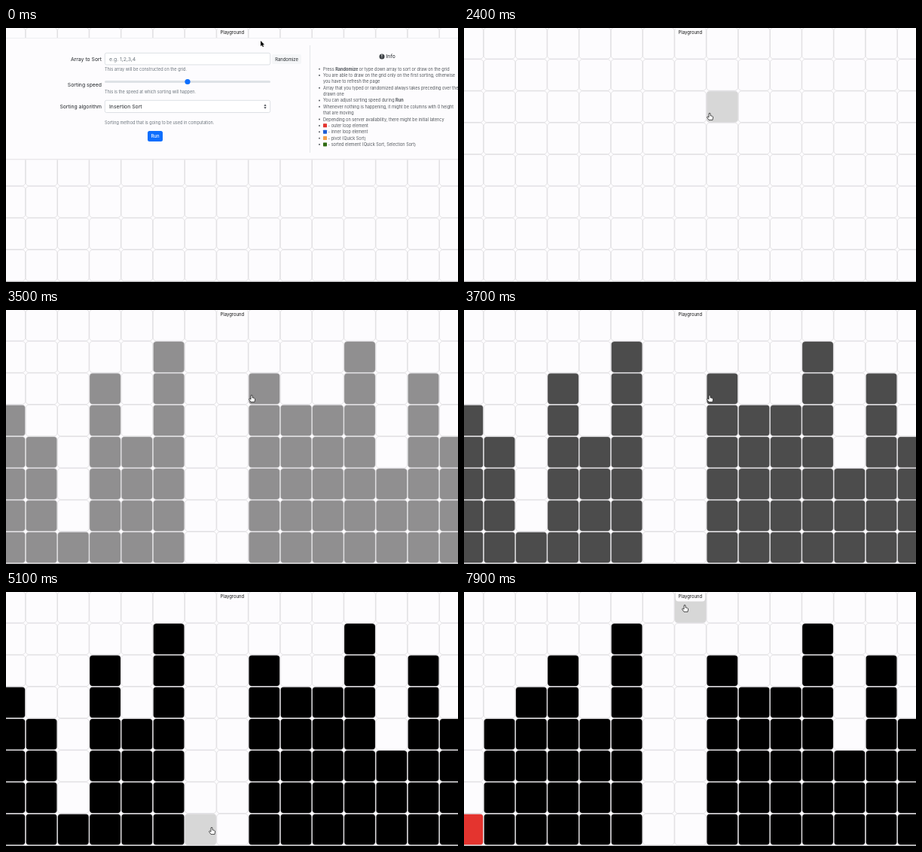
An HTML page with a canvas for the animation above (8 s loop, 600 px wide and 338 px high).

```html
<!DOCTYPE html>
<html lang="en">
<head>
<meta charset="utf-8">
<title>Sorting playground</title>
<style>
html, body { margin: 0; width: 100%; height: 100%; overflow: hidden; background: #fdfcfe; }
canvas { display: block; width: 100vw; height: 100vh; }
</style>
</head>
<body>
<canvas></canvas>
<script>
const W = 600, H = 338, LOOP = 8000;
const CELL = 42.25, LEFT = -16.3, TOP = -0.9, COLS = 15, ROWS = 8;
const WHITE = [253, 252, 254], BLACK = [0, 0, 0], RED = [228, 52, 47], HOVER = [215, 215, 215];
const PAPER = '#fdfcfe', LINE = '#d7d6d9', BLUE = '#0d6efd';
const DARK = '#212529', MUTED = '#6c757d', BODY = '#50555a';
const FONT = 'Inter, "Open Sans", sans-serif';

const canvas = document.querySelector('canvas');
const ctx = canvas.getContext('2d');

const clamp = v => Math.min(1, Math.max(0, v));
const smooth = v => v * v * (3 - 2 * v);
const lerp = (a, b, k) => a + (b - a) * k;
const mix = (a, b, k) => a.map((v, i) => lerp(v, b[i], k));
const rgb = c => `rgb(${c.map(Math.round)})`;

// CSS "ease": cubic-bezier(.25, .1, .25, 1)
function ease(x) {
  if (x <= 0 || x >= 1) return clamp(x);
  let lo = 0, hi = 1, u = 0.5;
  for (let i = 0; i < 20; i++) {
    u = (lo + hi) / 2;
    const bx = 0.75 * u * (1 - u) + u ** 3;
    if (bx < x) lo = u; else hi = u;
  }
  return 0.3 * u * (1 - u) ** 2 + 3 * u * u * (1 - u) + u ** 3;
}

// Sorting steps: the bars so far and which one is marked
const rest = [6, 4, 7, 0, 0, 6, 5, 5, 7, 3, 6, 4];
const steps = [
  { at: 3158, dur: 1316, bars: [5, 4, 1], red: -1 },
  { at: 6320, dur: 180, bars: [5, 4, 1], red: 1 },
  { at: 6480, dur: 180, bars: [4, 5, 1], red: 0 },
  { at: 6640, dur: 200, bars: [4, 5, 1], red: 2 },
  { at: 7010, dur: 220, bars: [4, 1, 5], red: 1 },
  { at: 7400, dur: 220, bars: [1, 4, 5], red: 0 }
].map(s => ({ ...s, bars: s.bars.concat(rest) }));

// Hovered cells: column, row, from, to
const hovers = [
  [5, 3, 1600, 1890], [6, 3, 1890, 1950], [7, 3, 1950, 2030], [8, 2, 2030, 3150],
  [6, 7, 4820, 5260], [7, 7, 5260, 5360], [7, 0, 7560, 9000]
];

// Pointer hotspot: time, x, y
const trail = [
  [0, 338, 17], [100, 338, 17], [900, 198, 147], [1450, 200, 145], [1700, 200, 145],
  [2130, 326, 113], [4050, 326, 113], [4400, 326, 165], [4650, 326, 165],
  [4920, 273, 313], [5230, 273, 313], [5400, 300, 345], [5401, 306, -14],
  [7450, 306, -14], [7850, 293, 17], [8000, 293, 17]
];
const ARROW = new Path2D('M0 0V7.2L1.7 5.7L2.9 8.3L4 7.8L2.9 5.3H5.1Z');
const HAND = new Path2D('M-1 .8Q0 -.6 1 .8V3.6L3.5 4.3Q4.8 4.7 4.6 6.2L4 9.4H-1L-3.3 6.2Q-3.6 4.9 -2.4 5L-1 6Z');

function box(x, y, w, h, r, fill, stroke, lw = 0.7) {
  ctx.beginPath();
  ctx.roundRect(x, y, w, h, r);
  if (fill) { ctx.fillStyle = fill; ctx.fill(); }
  if (stroke) { ctx.strokeStyle = stroke; ctx.lineWidth = lw; ctx.stroke(); }
}

function disc(x, y, r, fill) {
  ctx.beginPath();
  ctx.arc(x, y, r, 0, 7);
  ctx.fillStyle = fill;
  ctx.fill();
}

function text(str, x, y, size, fill, align = 'left', weight = 400) {
  ctx.font = `${weight} ${size}px ${FONT}`;
  ctx.textAlign = align;
  ctx.fillStyle = fill;
  ctx.fillText(str, x, y + size * 0.36);
  return ctx.measureText(str).width;
}

function cellColor(col, row, t) {
  let c = WHITE;
  for (const [hc, hr, from, to] of hovers) {
    if (hc === col && hr === row) {
      c = mix(c, HOVER, ease((t - from) / 250) * (1 - ease((t - to) / 250)));
    }
  }
  for (const s of steps) {
    if (t <= s.at) break;
    const filled = ROWS - row <= s.bars[col];
    if (!filled && s === steps[0]) continue;
    const goal = !filled ? WHITE : col === s.red ? RED : BLACK;
    // Empty cells that never hold a bar keep their hover tint
    if (!filled && col > 2) continue;
    c = mix(c, goal, ease((t - s.at) / s.dur));
  }
  return rgb(c);
}

function drawGrid(t) {
  for (let col = 0; col < COLS; col++) {
    for (let row = 0; row < ROWS; row++) {
      const x = LEFT + col * CELL, y = TOP + row * CELL;
      box(x + 0.55, y + 0.55, CELL - 1.1, CELL - 1.1, 4, cellColor(col, row, t));
      box(x + 0.3, y + 0.3, CELL - 0.6, CELL - 0.6, 4.2, null, LINE, 0.65);
    }
  }
  ctx.fillStyle = '#b4b4b6';
  ctx.fillRect(0, 337, W, 1);
}

const notes = [
  ['Press ', '*Randomize', ' or type down array to sort or draw on the grid'],
  ['You are able to draw on the grid only on the first sorting, otherwise'],
  ['>you have to refresh the page'],
  ['Array that you typed or randomized always takes preceding over the'],
  ['>drawn one'],
  ['You can adjust sorting speed during ', '*Run'],
  ['Whenever nothing is happening, it might be columns with 0 height'],
  ['>that are moving'],
  ['Depending on server availability, there might be initial latency'],
  ['#e3342f', ' - outer loop element'],
  ['#1f5fd6', ' - inner loop element'],
  ['#f6a04a', ' - pivot (Quick Sort)'],
  ['#2f6b12', ' - sorted element (Quick Sort, Selection Sort)']
];

function drawNotes() {
  disc(499, 38, 3.5, '#3c4045');
  text('!', 499, 38, 5.5, '#fff', 'center', 700);
  text('Info', 504.5, 38, 6.85, DARK);
  notes.forEach((parts, i) => {
    const y = 54.6 + i * 8.37;
    let x = 421;
    if (parts[0][0] !== '>') disc(416, y, 0.95, BODY);
    for (const part of parts) {
      if (part[0] === '#') {
        box(x, y - 2.6, 5, 5, 0.6, part);
        x += 5;
      } else {
        const bold = part[0] === '*';
        x += text(part.replace(/^[*>]/, ''), x, y, 5.55, BODY, 'left', bold ? 700 : 400);
      }
    }
  });
}

function caret(x, y, dir) {
  ctx.beginPath();
  ctx.moveTo(x - 1.6, y);
  ctx.lineTo(x + 1.6, y);
  ctx.lineTo(x, y + 2.1 * dir);
  ctx.fillStyle = '#343a40';
  ctx.fill();
}

function drawForm(t) {
  text('Array to Sort', 127, 41.3, 6.85, DARK, 'right');
  text('Sorting speed', 127, 75.3, 6.85, DARK, 'right');
  text('Sorting algorithm', 127, 104.5, 6.85, DARK, 'right');

  box(131.3, 33.3, 219.4, 15.6, 2, '#fff', '#ced4da');
  text('e.g. 1,2,3,4', 137, 41.3, 6.85, MUTED);
  box(353, 35, 39, 13, 2, '#f5f6f8');
  text('Randomize', 372.5, 41.8, 5.85, DARK, 'center');
  text('This array will be constructed on the grid.', 131, 55.2, 5.55, MUTED);

  box(131, 70, 220, 3, 1.5, '#dee2e6');
  disc(241, 71.5, 3.6, BLUE);
  text('This is the speed at which sorting will happen.', 131, 85, 5.55, MUTED);

  box(131.3, 96.3, 219.4, 16.2, 2, '#fff', '#ced4da');
  text('Insertion Sort', 137, 104.5, 6.85, DARK);
  caret(344, 103.7, -1);
  caret(344, 105.3, 1);
  text('Sorting method that is going to be used in computation.', 131, 126, 5.55, MUTED);

  const glow = clamp((t - 1050) / 200);
  if (glow) box(187.2, 136.2, 21.6, 15.6, 3.2, null, `rgba(13,110,253,${0.4 * glow})`, 1.8);
  const hover = clamp((t - 750) / 150);
  box(188, 137, 20, 14, 2.5, rgb(mix([13, 110, 253], [11, 94, 215], hover)));
  text('Run', 198, 144, 5.9, '#fff', 'center', 500);
}

function drawPanel(t) {
  const bottom = lerp(175, 13, ease((t - 1480) / 500));
  if (bottom < 13.5) return;
  ctx.save();
  ctx.beginPath();
  ctx.rect(0, 13, W, bottom - 13 + 0.5);
  ctx.clip();
  ctx.fillStyle = PAPER;
  ctx.fillRect(0, 13, W, H);
  ctx.fillStyle = '#dee0e4';
  ctx.fillRect(0, 13, W, 0.5);
  ctx.fillRect(403, 23, 0.8, 143);
  drawForm(t);
  drawNotes();
  ctx.fillStyle = LINE;
  ctx.fillRect(0, bottom - 0.5, W, 1);
  ctx.restore();
}

function drawTab() {
  box(280.8, -3, 39.4, 15.4, 4, PAPER);
  text('Playground', 300.3, 6.2, 5.9, '#111', 'center');
}

function drawPointer(t) {
  const i = trail.findIndex(k => k[0] > t);
  const a = trail[i - 1], b = trail[i];
  const k = smooth((t - a[0]) / (b[0] - a[0]));
  const arrow = t < 750;
  ctx.save();
  ctx.translate(lerp(a[1], b[1], k), lerp(a[2], b[2], k));
  const shape = arrow ? ARROW : HAND;
  ctx.lineJoin = 'round';
  ctx.lineWidth = arrow ? 1.1 : 0.8;
  ctx.strokeStyle = arrow ? '#fff' : '#222';
  ctx.fillStyle = arrow ? '#000' : '#fff';
  if (arrow) { ctx.stroke(shape); ctx.fill(shape); }
  else { ctx.fill(shape); ctx.stroke(shape); }
  ctx.restore();
}

function frame() {
  const t = performance.now() % LOOP;
  const dpr = window.devicePixelRatio || 1;
  const w = Math.round(innerWidth * dpr), h = Math.round(innerHeight * dpr);
  if (canvas.width !== w || canvas.height !== h) {
    canvas.width = w;
    canvas.height = h;
  }
  ctx.setTransform(w / W, 0, 0, h / H, 0, 0);
  ctx.fillStyle = PAPER;
  ctx.fillRect(0, 0, W, H);
  drawGrid(t);
  drawPanel(t);
  drawTab();
  drawPointer(t);
  requestAnimationFrame(frame);
}
frame();
</script>
</body>
</html>
```
